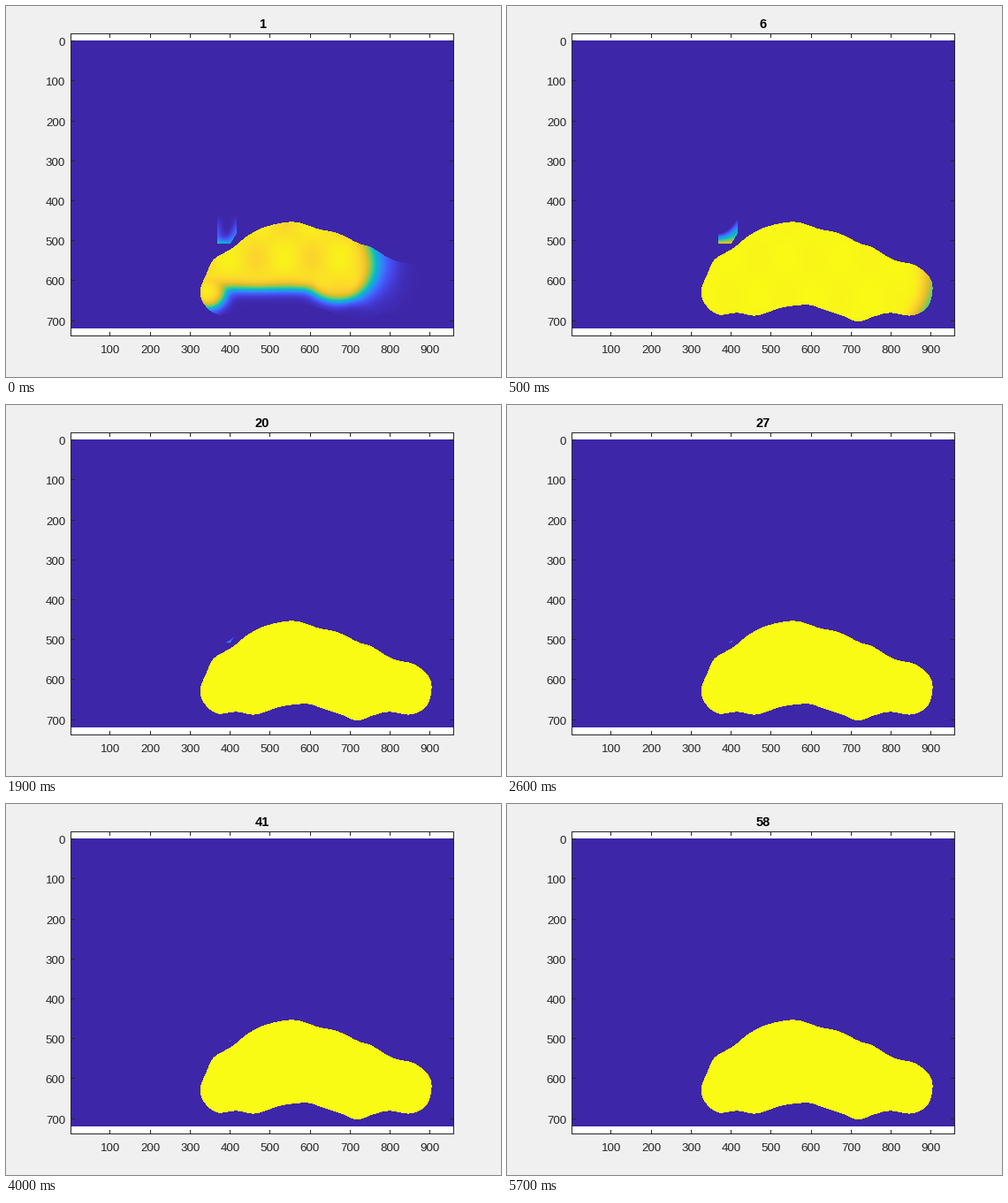
Animation of 560 by 420 pixels, one loop 5.8 s. Source, as a matplotlib script:

```python
import numpy as np
import matplotlib.pyplot as plt
from matplotlib.animation import FuncAnimation
from matplotlib.colors import LinearSegmentedColormap
from matplotlib.patches import Rectangle
from matplotlib.path import Path

W, H, FRAMES = 560, 420, 58
LEFT, RIGHT, TOP, BOTTOM = 73, 506, 31, 373
X0, X1, Y0, Y1 = 215, 490, 230, 364
SCALE = 434 / 960
DARK = "#262626"

CMAP = LinearSegmentedColormap.from_list("bluegold", [
    "#3e26a8", "#4747eb", "#3e6fff", "#2797eb", "#08b5d0",
    "#31c69f", "#81cc59", "#dcbd29", "#fccf30", "#f9fb15"])

# Key points of the body outline, joined by a smooth closed curve.
BODY = [
    (220, 324), (228, 302), (236, 287), (256, 275), (275, 260), (296, 250),
    (326, 245), (354, 253), (376, 258), (399, 269), (414, 274), (438, 288),
    (462, 294), (478, 307), (482, 322), (476, 342), (458, 351), (434, 348),
    (416, 352), (398, 358), (382, 352), (358, 344), (341, 339), (312, 342),
    (283, 351), (261, 348), (240, 350), (226, 340)]

gx, gy = np.meshgrid(np.arange(X0, X1) + .5, np.arange(Y0, Y1) + .5)


def smooth_loop(points, steps=8):
    """Closed Catmull-Rom curve."""
    p = np.array(points, float)
    a, c, d = (np.roll(p, s, axis=0)[:, None] for s in (1, -1, -2))
    b = p[:, None]
    t = (np.arange(steps) / steps)[None, :, None]
    curve = b + .5 * t * (c - a + t * (2 * a - 5 * b + 4 * c - d
                                       + t * (3 * (b - c) + d - a)))
    return curve.reshape(-1, 2)


def disc(cx, cy, r):
    return r - np.hypot(gx - cx, gy - cy)


def blend(a, b, soft=3):
    return soft * np.logaddexp(a / soft, b / soft)


grid = np.column_stack([gx.ravel() + .5, gy.ravel() + .6])
body = Path(smooth_loop(BODY)).contains_points(grid).reshape(gx.shape)
flap = ((gx > 239) & (gx < 261) & (gy > 232) & (gy < 269)
        & (gx < 254 + .6 * (269 - gy)))


def body_value(k):
    # The front is a slab on two discs, drifting right and spreading.
    slab = np.minimum(320.5 + 3 * k - gy, 393 + 8 * k - gx)
    wheels = blend(disc(229 + 3 * k, 322 + k, 20),
                   disc(376 + 8 * k, 291 + 3 * k, 43))
    depth = blend(slab, wheels) + 1.2 * k * k
    width = 3.5 + 6 * np.clip((gx - 390 - 8 * k) / 50, 0, 1)
    v = 1 / (1 + np.exp(-depth / width))
    ripple = 1 - .6 * np.cos((gx - 315) / 10) * np.cos((gy - 285) / 14)
    return v * (1 - .06 * max(0, 1 - k / 6) * ripple)


def flap_value(k):
    amp = .45 + .08 * k if k < 5 else .15 + .7 * np.exp((5 - k) / 14)
    base = 22 * np.exp(-(k / 10) ** 1.5) - 4
    rise = 13 + 9 * np.exp(-k / 8)
    q = (gx - 239) / 22
    height = np.maximum(base + rise * q * q, 1e-3)
    up = np.clip(1 - (269 - gy) / height, 0, 1)
    rim = .18 * max(0, 1 - k / 2) * (2 * q - 1) ** 2 * np.clip((gy - 236) / 20, 0, 1)
    return amp * up ** (.8 + 3 * np.exp(-k / 2)) + rim


def field(k):
    return np.where(body, body_value(k), np.where(flap, flap_value(k), 0))


plt.rcParams["font.family"] = "Liberation Sans"
fig = plt.figure(figsize=(W / 100, H / 100), dpi=100, facecolor="#f0f0f0")
ax = fig.add_axes([0, 0, 1, 1])
ax.axis("off")


def box(x, y, w, h, color, z=3):
    ax.add_patch(Rectangle((x, y), w, h, fc=color, lw=0, antialiased=False, zorder=z))


def label(x, y, s, px, **kw):
    return ax.text(x, y, s, fontsize=px * .72, va="baseline", **kw)


box(LEFT, TOP, RIGHT - LEFT, BOTTOM - TOP, "white", 0)
box(LEFT, 39, RIGHT - LEFT, 326, CMAP(0.0), 1)
img = ax.imshow(field(0), cmap=CMAP, vmin=0, vmax=1, interpolation="nearest",
                extent=(X0, X1, Y1, Y0), aspect="auto", zorder=2)

for y in (TOP, BOTTOM):
    box(LEFT, y, RIGHT - LEFT + 1, 1, DARK)
for x in (LEFT, RIGHT):
    box(x, TOP, 1, BOTTOM - TOP + 1, DARK)

for n in range(100, 1000, 100):
    x = 72.77 + SCALE * n
    for y in (TOP, BOTTOM - 4):
        box(int(x), y, 1, 5, DARK)
    label(x - .2, 393, str(n), 13.33, ha="center", color=DARK)
for n in range(0, 800, 100):
    y = 39.67 + SCALE * n
    for x in (LEFT, RIGHT - 4):
        box(x, int(y), 5, 1, DARK)
    label(67, y + 5.5, str(n), 13.33, ha="right", color=DARK)

title = label(290, 25, "1", 14.67, ha="center", weight="bold", color="black")
ax.set_xlim(0, W)
ax.set_ylim(H, 0)


def update(k):
    img.set_data(field(k))
    title.set_text(str(k + 1))
    return img, title


anim = FuncAnimation(fig, update, frames=FRAMES, interval=100, repeat=True,
                     repeat_delay=0, blit=False)
plt.show()
```
